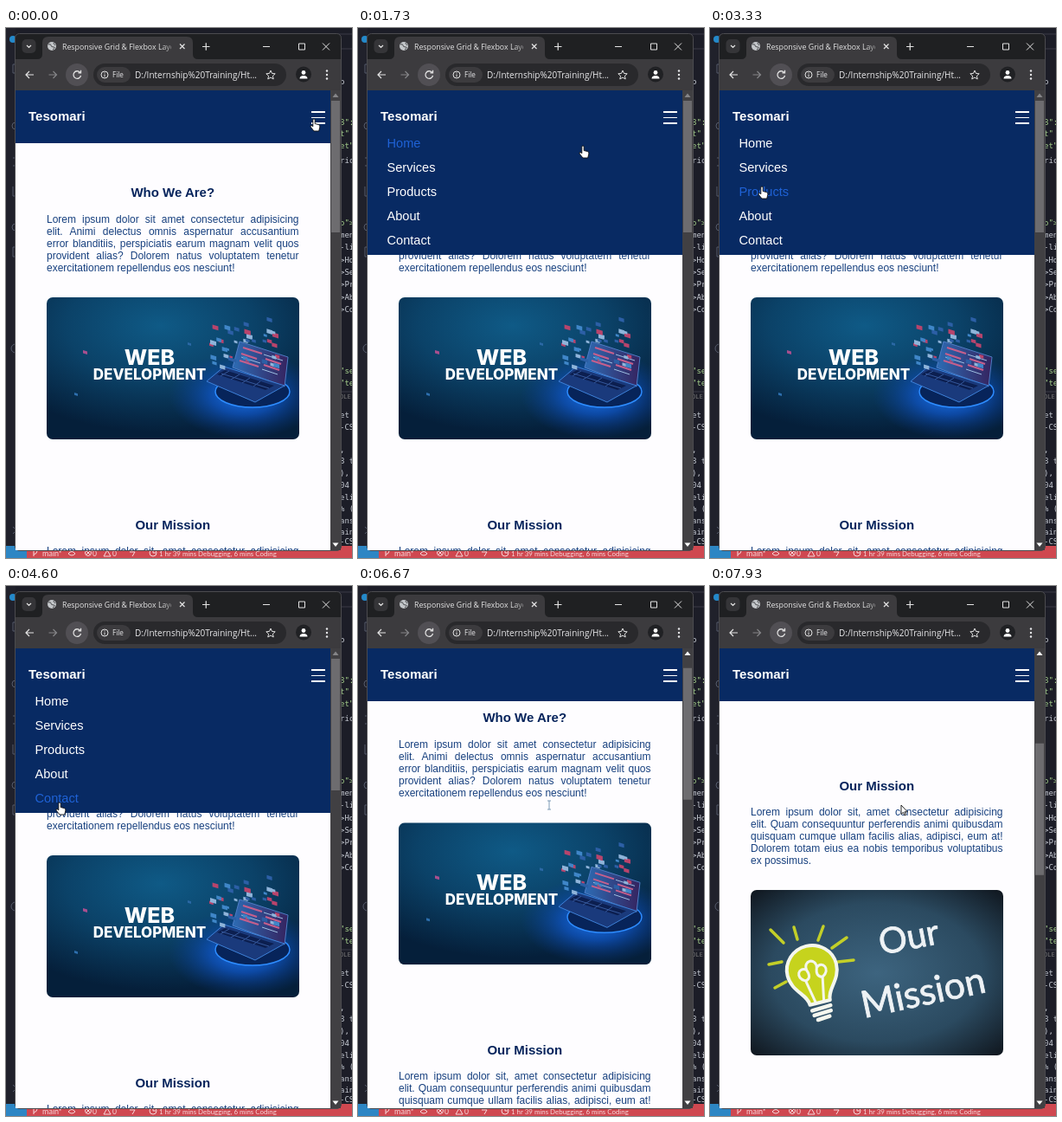
Recreate the animation shown at these times as an HTML page. Size 400 by 612 pixels, loop 8000 ms.

```html
<!DOCTYPE html>
<html lang="en">
<head>
<meta charset="utf-8">
<title>Responsive menu demo</title>
<style>
html, body { margin: 0; width: 100%; height: 100%; overflow: hidden; background: #1c1d27; }
#stage { position: relative; width: 400px; height: 612px; overflow: hidden; }
#stage > *, #content > * { position: absolute; }
.layer { left: 0; top: 0; width: 400px; height: 612px; }
#page { background: #fefdff; clip-path: inset(72px 25px 9px 11px); font-family: "Liberation Sans", Arial, sans-serif; }
#content { position: absolute; left: 0; top: 0; }
h2 { margin: 0; left: 47px; width: 291.5px; font: bold 15px/18px "Liberation Sans", Arial, sans-serif; text-align: center; color: #06245c; }
.para { left: 47px; width: 291.5px; font-size: 12px; line-height: 14px; color: #17407f; }
.para div { text-align: justify; text-align-last: justify; }
.para div:last-child { text-align-last: left; }
.picture { left: 47px; width: 291.5px; border-radius: 7px; }
#header { position: absolute; left: 11px; top: 72px; width: 364px; background: #082a63; color: #fff; overflow: hidden; }
#header * { position: absolute; }
#brand { left: 15px; top: 21px; font: bold 15px/18px "Liberation Sans", Arial, sans-serif; }
.link { left: 22.5px; font-size: 14.6px; line-height: 18px; }
.bar { left: 342px; width: 16px; height: 1.6px; background: #fff; }
.ui { font-family: "Open Sans", "Noto Sans", sans-serif; }
.code { font: 9px "DejaVu Sans Mono", monospace; }
</style>
</head>
<body>
<div id="stage">
  <svg class="layer" id="desktop">
    <rect width="400" height="612" fill="#1c1d27"/>
    <rect width="11" height="612" fill="#20212b"/>
    <path d="M362 7H400M362 7V20M388 24H400" stroke="#3a3b47" fill="none"/>
    <circle cx="8" cy="13" r="4" fill="#2489ca"/>
    <g fill="none" stroke="#555b6b">
      <path d="M8 42h5v10h-5zM8 150h5v9h-5M8 183v11h5M8 253h5v11h-5zM8 576l4 4-4 4"/>
      <circle cx="11" cy="113" r="4"/><circle cx="11" cy="230" r="4"/><circle cx="11" cy="370" r="5"/>
    </g>
    <path d="M387 420H400" stroke="#3a3b47"/>
    <g id="code" class="code"></g>
    <rect y="598" width="400" height="14" fill="#cf4850"/>
    <rect y="598" width="24" height="14" fill="#2d86c4"/>
    <g fill="#f6d9dc" font-family="Lato, sans-serif">
      <text x="42" y="610" font-size="9">main*</text>
      <text x="100" y="610" font-size="8.5">0</text>
      <text x="123" y="610" font-size="8.5">0</text>
      <text x="177" y="609.5" font-size="7.9">1 hr 39 mins Debugging, 6 mins Coding</text>
    </g>
    <g fill="none" stroke="#f6d9dc">
      <path d="M32 604v6M36 604q0 3-4 4M113 610l4-7 4 7zM72 607q4-5 8 0-4 4-8 0M93 604l4 4m0-4l-4 4M143 605h6l-3 5"/>
      <circle cx="95" cy="606" r="3.5"/><circle cx="170" cy="606" r="4"/><path d="M170 603v3h3"/>
    </g>
  </svg>

  <svg class="layer ui">
    <defs>
      <linearGradient id="fade"><stop offset=".82" stop-color="#e3e3e3"/><stop offset="1" stop-color="#e3e3e3" stop-opacity="0"/></linearGradient>
    </defs>
    <rect x="10.5" y="6.5" width="377" height="597" rx="5" fill="#1f2022" stroke="#4b4b4f"/>
    <path d="M36 36q6 0 6-6V17q0-7 7-7h160q7 0 7 7v13q0 6 6 6H387V72H11V36Z" fill="#3c3b3e"/>
    <rect x="18.5" y="13" width="16" height="16" rx="5" fill="#353538"/>
    <circle cx="53" cy="21" r="5" fill="#c4c7ca"/>
    <path d="M49 19q3-1 3 1t3 2-1 3M55 17q0 2 2 3" fill="none" stroke="#4a4b4e"/>
    <svg x="65" y="8" width="126" height="26"><text y="17" font-size="8.8" fill="url(#fade)">Responsive Grid &amp; Flexbox Layout</text></svg>
    <g fill="none" stroke="#e3e3e3" stroke-width="1.2">
      <path d="M24 20l2.500 2.500 2.500-2.500M201 18.500l5.500 5.500m0-5.500l-5.500 5.500M227 21.500h8.500m-4.250-4.250v8.500"/>
      <path d="M297 21.500h8M338.500 18h7v7h-7zM366 17.500l8 8m0-8l-8 8" stroke-width="1"/>
      <path d="M32 54h-9m4-4l-4 4 4 4"/>
      <path d="M49.500 54h9m-4-4l4 4-4 4" stroke="#858588"/>
    </g>
    <circle cx="82" cy="54" r="13" fill="#514f54"/>
    <path d="M85.500 51.200a4.300 4.300 0 1 0 1 3.600M86.500 48.800v3h-3" fill="none" stroke="#e3e3e3" stroke-width="1.3"/>
    <rect x="101" y="41" width="223" height="26" rx="13" fill="#29292c"/>
    <rect x="105" y="45" width="39" height="18" rx="9" fill="#3c3b3e"/>
    <circle cx="114" cy="54" r="4" fill="none" stroke="#e3e3e3"/>
    <path d="M114 53.500v3M114 51.500v1" stroke="#e3e3e3"/>
    <g fill="#e8e8ea">
      <text x="123" y="57" font-size="8.2">File</text>
      <text x="149" y="57.5" font-size="10">D:/Internship%20Training/Ht...</text>
      <circle cx="371" cy="49.5" r="1.2"/><circle cx="371" cy="54" r="1.2"/><circle cx="371" cy="58.5" r="1.2"/>
    </g>
    <path d="M306 49l1.500 3.400 3.700.4-2.800 2.500.8 3.700-3.200-1.900-3.200 1.900.8-3.700-2.800-2.500 3.700-.4Z" fill="none" stroke="#e3e3e3"/>
    <circle cx="344" cy="53.5" r="9" fill="#202124"/>
    <circle cx="344" cy="51.5" r="2.4" fill="#fff"/>
    <path d="M339.500 58.500q0-3.500 4.500-3.500t4.500 3.500Z" fill="#fff"/>
    <rect x="375" y="72" width="12" height="531" fill="#414043"/>
    <rect id="thumb" x="376" width="10" height="152" fill="#6d6c6f"/>
    <path id="upArrow" d="M377.500 80l3.500-4.500 3.500 4.500Z"/>
    <path d="M377.500 594.500l3.500 4.500 3.500-4.500Z" fill="#fff"/>
  </svg>

  <div class="layer" id="page">
    <div id="content">
      <h2 style="top:181px">Who We Are?</h2>
      <div class="para" style="top:214px">
        <div>Lorem ipsum dolor sit amet consectetur adipisicing</div>
        <div>elit. Animi delectus omnis aspernatur accusantium</div>
        <div>error blanditiis, perspiciatis earum magnam velit quos</div>
        <div>provident alias? Dolorem natus voluptatem tenetur</div>
        <div>exercitationem repellendus eos nesciunt!</div>
      </div>
      <svg class="picture" style="top:311px;height:164px" viewBox="47 311 291.5 164">
        <defs>
          <radialGradient id="sea" cx=".45" cy=".2" r=".75">
            <stop stop-color="#0f5a86"/><stop offset=".5" stop-color="#0b4268"/><stop offset="1" stop-color="#051f3a"/>
          </radialGradient>
          <radialGradient id="glow"><stop stop-color="#1d78f5"/><stop offset=".45" stop-color="#0f55c4" stop-opacity=".75"/><stop offset="1" stop-color="#0a3c90" stop-opacity="0"/></radialGradient>
          <linearGradient id="screen"><stop stop-color="#2d6cb4"/><stop offset="1" stop-color="#35235f"/></linearGradient>
        </defs>
        <rect x="47" y="311" width="292" height="164" fill="url(#sea)"/>
        <ellipse cx="276" cy="424" rx="88" ry="50" fill="url(#glow)"/>
        <ellipse cx="285" cy="420" rx="43" ry="18" fill="#07245a" stroke="#2d8cff" stroke-width="1.5"/>
        <path d="M270 362L326 380 322 414 262 392Z" fill="url(#screen)" stroke="#4f7cc4"/>
        <path d="M252 391L322 413 288 432 232 408Z" fill="#1a3a7c" stroke="#3d80d8"/>
        <path d="M253 395L310 413 300 418 244 400Z" fill="#0c1f50"/>
        <path d="M249 399L304 416M258 396L248 402M270 400L260 406M282 404L273 410M294 408L286 414" stroke="#35589c"/>
        <path d="M274 369L296 376M272 376L290 382M300 382L318 388M298 389L316 395M270 384L292 391" stroke="#c65f8c" stroke-width="2"/>
        <path d="M298 377L320 384M272 380L294 387M296 394L314 400" stroke="#9dbde0"/>
        <g id="cards"></g>
        <g fill="#fff" font-family="Inter, sans-serif" font-weight="800" text-anchor="middle">
          <text x="166" y="388.5" font-size="25">WEB</text>
          <text x="166" y="406" font-size="17">DEVELOPMENT</text>
        </g>
      </svg>
      <h2 style="top:565px">Our Mission</h2>
      <div class="para" style="top:597px">
        <div>Lorem ipsum dolor sit, amet consectetur adipisicing</div>
        <div>elit. Quam consequuntur perferendis animi quibusdam</div>
        <div>quisquam cumque ullam facilis alias, adipisci, eum at!</div>
        <div>Dolorem totam eius ea nobis temporibus voluptatibus</div>
        <div>ex possimus.</div>
      </div>
      <svg class="picture" style="top:694px;height:191px" viewBox="47 351 291.5 191">
        <defs>
          <radialGradient id="slate" r=".7"><stop stop-color="#3d647f"/><stop offset=".6" stop-color="#2b4a60"/><stop offset="1" stop-color="#10171f"/></radialGradient>
        </defs>
        <rect x="47" y="351" width="292" height="191" fill="url(#slate)"/>
        <path d="M70 397L85 412M97 394L101 408M131 393L125 409M158 406L141 418M166 432L148 434M68 437L83 434M75 464L88 457" stroke="#c3cf28" stroke-width="3.5" stroke-linecap="round"/>
        <g transform="translate(118 444) rotate(-14)" fill="none" stroke="#f4f6ee" stroke-linecap="round" stroke-linejoin="round">
          <path d="M-12 38C-12 25-29 18-29-1A29 28 0 0 1 29-1C29 18 12 25 12 38Z" fill="#c6d31d" stroke-width="4"/>
          <path d="M-5 36L-10 10C-22 4-14-9-6-2-8-14 8-14 6-2 14-9 22 4 10 10L5 36M-10 10Q-2 8-6-2M10 10Q2 8 6-2" stroke-width="3"/>
          <path d="M-11 45L11 44M-10 51L10 50M-7 57L7 56" stroke-width="4.5"/>
        </g>
        <g fill="#eef2f5" stroke="#eef2f5" stroke-width=".8" font-family="Lato, sans-serif">
          <text transform="translate(198 426) rotate(-11)" font-size="41">Our</text>
          <text transform="translate(178 499) rotate(-12)" font-size="43">Mission</text>
        </g>
      </svg>
    </div>
    <div id="header">
      <div id="brand">Tesomari</div>
      <div class="bar" style="top:24px"></div>
      <div class="bar" style="top:30.5px"></div>
      <div class="bar" style="top:37px"></div>
    </div>
  </div>

  <svg class="layer">
    <g id="cursor" stroke="#111" stroke-width=".9" stroke-linejoin="round" fill="#fff">
      <path id="hand" d="M-1.200 1.200a1.200 1.200 0 0 1 2.400 0V5.500l4 1q2 .6 1.700 2.600L5.700 14H0L-3.800 9.300q-.8-1.700.8-1.900L-1.200 8.800Z"/>
      <path id="arrow" d="M0 0V10.500L2.400 8.300 4 12 5.600 11.300 4 7.800H7.300Z"/>
      <path id="beam" d="M-2-5h4M0-5V5M-2 5h4" stroke="#6f8fae"/>
    </g>
  </svg>
</div>

<script>
const LOOP = 8000, MENU_OPEN = 530, MENU_CLOSE = 5930, SCROLL_START = 6530, CURSOR_REFRESH = 7430;
const ROW_TOP = 119, ROW_HEIGHT = 28.1;

// [time, x, y] of the pointer's hot spot
const pointerPath = [
  [0, 356, 105], [900, 356, 105], [1600, 260, 136], [1800, 260, 136], [2350, 58, 134],
  [2600, 58, 136], [2900, 58, 158], [3200, 60, 183], [3400, 60, 183], [3750, 60, 212],
  [4000, 61, 216], [4350, 62, 250], [4730, 62, 250], [5530, 371, 95], [6030, 371, 95], [6470, 221, 253]
];
const scrollPath = [[SCROLL_START, 0], [7200, 179], [7930, 343]];

const $ = id => document.getElementById(id);
const linear = u => u, smooth = u => u * u * (3 - 2 * u);

function sample(path, t, ease, column = 1) {
  const next = path.findIndex(key => key[0] > t);
  if (next === 0) return path[0][column];
  if (next < 0) return path[path.length - 1][column];
  const a = path[next - 1], b = path[next];
  return a[column] + (b[column] - a[column]) * ease((t - a[0]) / (b[0] - a[0]));
}

const links = ["Home", "Services", "Products", "About", "Contact"].map((label, i) => {
  const link = document.createElement("div");
  link.className = "link";
  link.textContent = label;
  link.style.top = 52 + i * ROW_HEIGHT + "px";
  $("header").append(link);
  return link;
});

// Editor text showing to the right of the browser window
const codeLines = [
  [65, " b"], [112, '8":'], [125, 't"'], [139, 'et"'], [156, "ric"], [228, 'o">'], [242, "men"], [256, "-li"],
  [271, ">Ho"], [285, ">Se"], [299, ">Pr"], [314, ">Ab"], [328, ">Co"], [399, '"se'], [413, '"te'],
  [450, "et "], [464, "-CS"], [490, ", "], [503, "8 t"], [517, "),"], [531, "04"], [545, "eli"],
  [558, "% ("], [572, "ans"], [585, "ain"], [596, "-CS"]
];
$("code").innerHTML = codeLines.map(([y, text]) =>
  `<text x="386" y="${y}" fill="${text.includes('"') ? "#a5cf8c" : "#c8ccd4"}">${text.replace(">", "&gt;")}</text>`
).join("") + '<text x="386" y="428" font-size="7" fill="#777">OLE</text>';

// Small cards floating above the laptop
let seed = 11;
const random = () => (seed = seed * 16807 % 2147483647) / 2147483647;
const cardColors = ["#b8446c", "#3f86c8", "#8fb4da", "#2c5fa6"];
const card = (x, y, size, color) =>
  `<path d="M${x} ${y}l${size} ${size * .3}v${size * .7}l${-size}${-size * .3}Z" fill="${color}"/>`;
let cards = card(89, 372, 5, "#a84f8e") + card(79, 421, 4, "#2d6fae") + card(210, 363, 4, "#2b68a5");
for (let i = 0; i < 40; i++) {
  const x = 235 + random() * 76, y = 332 + random() * 52 + Math.abs(x - 290) * .15;
  cards += card(x, y, 3.5 + random() * 4, cardColors[i % 4]);
}
$("cards").innerHTML = cards;

function render(t) {
  const x = sample(pointerPath, t, smooth), y = sample(pointerPath, t, smooth, 2);
  const scroll = sample(scrollPath, t, linear);
  const menuOpen = t >= MENU_OPEN && t < MENU_CLOSE;

  $("content").style.transform = `translateY(${-scroll}px)`;
  $("thumb").setAttribute("y", 84 + scroll * .285);
  $("upArrow").setAttribute("fill", scroll > 0 ? "#fff" : "#858588");

  $("header").style.height = (menuOpen ? 190 : 61) + "px";
  const row = menuOpen ? Math.floor((y - ROW_TOP) / ROW_HEIGHT) : -1;
  links.forEach((link, i) => {
    link.style.display = menuOpen ? "" : "none";
    link.style.color = i === row ? "#1f62d6" : "#fff";
  });

  const onButton = x > 350 && y < 112;
  const overText = !menuOpen && y > 214 && t < CURSOR_REFRESH;
  const shape = onButton || row >= 0 ? "hand" : overText ? "beam" : "arrow";
  for (const id of ["hand", "arrow", "beam"]) $(id).style.display = id === shape ? "" : "none";
  $("cursor").setAttribute("transform", `translate(${x} ${y})`);
}

function tick() {
  render(performance.now() % LOOP);
  requestAnimationFrame(tick);
}
tick();
</script>
</body>
</html>
```
